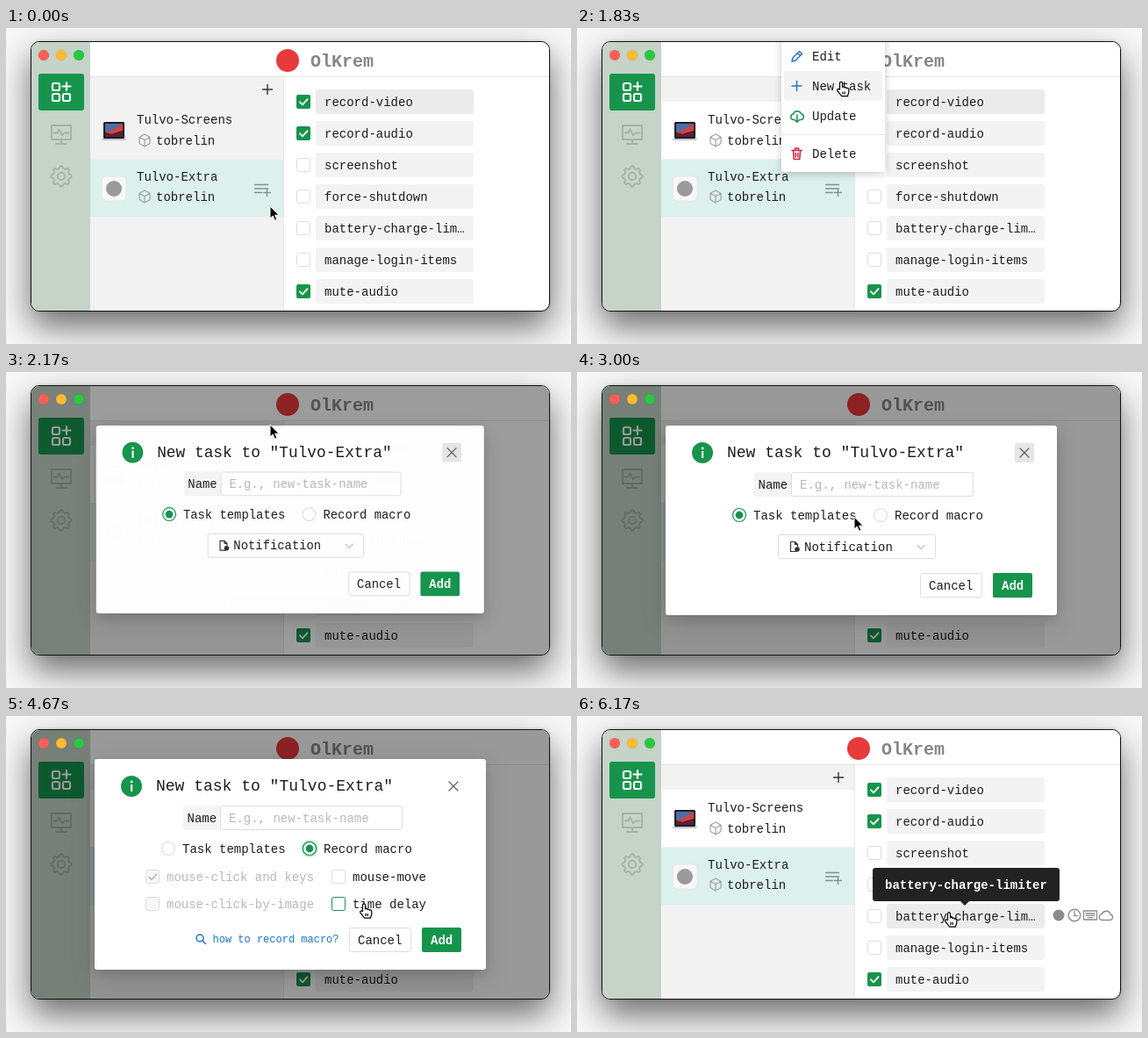
An HTML page that plays this animation: 644 px wide and 360 px high, repeating every 6340 ms.

```html
<!DOCTYPE html>
<html lang="en">
<head>
<meta charset="utf-8">
<title>Task manager demo</title>
<style>
  html, body { margin: 0; width: 100%; height: 100%; overflow: hidden; background: #fff; }
  #stage { position: relative; width: 644px; height: 360px; overflow: hidden; background: #f8f8f8; }
  #win { position: absolute; left: 28px; top: 15px; width: 590px; height: 306px; border: 1px solid #141414;
    border-radius: 10px; background: #fff; box-shadow: 0 17px 38px rgba(0, 0, 0, .58), 0 0 2px rgba(0, 0, 0, .25); }
  svg { position: absolute; left: 0; top: 0; }
  text { font: 14px "Courier New", "Liberation Mono", monospace; fill: #1c1c1c; }
  .b { font-weight: bold; }
  .title { font-size: 20px; font-weight: bold; fill: #868686; }
  .head { font-size: 18px; }
  .link { font-size: 12px; fill: #1b74cc; }
  .dim { fill: #b8b8b8; }
  .line { fill: none; stroke-linecap: round; stroke-linejoin: round; }
  #cancel.on rect, #select.on rect, #delay.on rect, #rec.on .ring { stroke: #16944c; }
  #cancel.on text { fill: #16944c; }
  #box { filter: drop-shadow(0 5px 7px rgba(0, 0, 0, .12)) drop-shadow(0 8px 14px rgba(0, 0, 0, .12)); }
  #menu > .card { filter: drop-shadow(0 2px 5px rgba(0, 0, 0, .22)); }
</style>
</head>
<body>
<div id="stage">
  <div id="win"></div>
  <svg id="art" width="644" height="360" viewBox="0 0 644 360"></svg>
</div>
<script>
const GREEN = '#16944c', GREY = '#8c8c8c', EDGE = '#dedee2';
const LOOP = 6340;

const text = (x, y, s, cls = '') => `<text x="${x}" y="${y}" class="${cls}">${s}</text>`;
const rect = (x, y, w, h, fill, more = '') =>
  `<rect x="${x}" y="${y}" width="${w}" height="${h}" fill="${fill}" ${more}/>`;
const frame = (x, y, w, h, rx = 2, fill = '#fff') =>
  rect(x + .5, y + .5, w - 1, h - 1, fill, `rx="${rx}" stroke="${EDGE}"`);
const circle = (x, y, r, fill, more = '') => `<circle cx="${x}" cy="${y}" r="${r}" fill="${fill}" ${more}/>`;
const line = (d, color, w = 1.5) => `<path class="line" d="${d}" stroke="${color}" stroke-width="${w}"/>`;
const group = (id, body, more = '') => `<g id="${id}" ${more}>${body}</g>`;

const tick = (x, y, color) => line(`M${x + 4} ${y + 8.3}l3 3 5.4-6`, color, 1.9);
const checkbox = (x, y, on) => on
  ? rect(x, y, 16, 16, GREEN, 'rx="2"') + tick(x, y, '#fff')
  : frame(x, y, 16, 16);
const cube = (x, y) => line(`M${x} ${y - 7}l6 3.3v7.2l-6 3.5-6-3.5v-7.2zM${x - 6} ${y - 3.7}l6 3.5 6-3.5M${x} ${y}v7`, '#a3a3a3', 1.2);

function gear(x, y) {
  let d = '';
  for (let i = 0; i < 32; i++) {
    const a = (i - .5) * Math.PI / 16, r = i % 4 < 2 ? 11.6 : 9.2;
    d += `${i ? 'L' : 'M'}${(x + r * Math.cos(a)).toFixed(1)} ${(y + r * Math.sin(a)).toFixed(1)}`;
  }
  return line(d + 'z', '#a4b1a8', 1.8) + circle(x, y, 4.2, 'none', 'stroke="#a4b1a8" stroke-width="1.8"');
}

const sidebar = rect(29, 16, 67, 306, '#c5d3c9') +
  rect(37, 52, 52, 42, GREEN, 'rx="3"') +
  [[53, 63], [53, 75], [65, 75]].map(([x, y]) =>
    rect(x, y, 8, 8, 'none', 'rx="1.8" stroke="#fff" stroke-width="2.2"')).join('') +
  line('M69 62v9M64.5 66.5h9', '#fff', 2.2) +
  line('M52 111h22v16H52zM63 127v4M57 132h12M54.5 119.5h4l2-4 3.5 7 2.5-3h5', '#a4b1a8', 1.8) +
  gear(63, 169);

const header = rect(96, 16, 523, 39, '#fff') + rect(96, 55, 523, 1, '#e6e6e6') +
  circle(321, 37, 13, '#e8393b') + text(347, 43.5, 'OlKrem', 'title');

const laptop = rect(111, 107, 24, 19, '#1c1c22', 'rx="1.5"') +
  '<path d="M113 109h20l-9 7-11 3z" fill="#4a6fa8"/><path d="M133 109v8l-13 4-7-2 11-4z" fill="#d8423c"/>' +
  '<path d="M113 124v-4l8 1 12-3v6z" fill="#5a1f3a"/>' + rect(109, 126, 28, 2, '#c4c4c8', 'rx="1"');

const projects = rect(96, 56, 220, 266, '#f2f2f2') + rect(316, 56, 1, 266, '#e8e8e8') +
  line('M298 64.5v11M292.5 70h11', '#333', 1.4) +
  rect(96, 84, 220, 65, '#fff', 'id="row"') + rect(96, 150, 220, 65, '#dcf0ec') + laptop +
  rect(109, 169, 28, 28, '#f7f7f7', 'rx="5" stroke="#e4e4e4"') + circle(123, 183, 9, '#9a9a9a') +
  text(149, 109, 'Tulvo-Screens') + text(149, 174, 'Tulvo-Extra') +
  [128, 192].map(y => cube(158, y) + text(171, y + 4.5, 'tobrelin')).join('') +
  line('M283.5 178.5h15M283.5 183h15M283.5 187.5h8M297.5 183.5v8M293.5 187.5h8', '#85918e', 1.4);

const names = ['record-video', 'record-audio', 'screenshot', 'force-shutdown',
  'battery-charge-lim…', 'manage-login-items', 'mute-audio'];
const tasks = names.map((s, i) => {
  const y = 84 + 36 * i;
  return checkbox(331, y - 8, [0, 1, 6].includes(i)) +
    rect(353, y - 14, 180, 28, '#f3f3f3', `id="task${i}" rx="3"`) + text(363, y + 4.5, s);
}).join('');

const tools = circle(549, 227, 6.5, GREY) +
  circle(567, 227, 6.8, 'none', `stroke="${GREY}" stroke-width="1.4"`) +
  line('M567 222.5v5h3.5', GREY, 1.3) +
  line('M577.5 222h15v10h-15zM580 225h10M580 227.3h10M582 229.7h6', GREY, 1.3) +
  line('M599 232.5a3.5 3.5 0 0 1-.5-7 5 5 0 0 1 9.5.5 3.3 3.3 0 0 1-.5 6.5z', GREY, 1.4);

const tip = rect(337, 173, 213, 38, '#222', 'rx="3"') + '<path d="M436 210h12l-6 6z" fill="#222"/>' +
  '<text x="351" y="197" class="b" style="fill:#fff">battery-charge-limiter</text>';

const menu = rect(233, 8, 118, 156, '#fff', 'class="card" rx="3"') +
  rect(236, 49, 112, 34, '#f3f3f3', 'id="hover" rx="3"') + rect(233, 121, 118, 1, '#e8e8e8') +
  ['Edit', 'New task', 'Update', 'Delete'].map((s, i) => text(268, [37, 71, 105, 148][i], s)).join('') +
  line('M245 38l1-4 7.5-7.5 3 3L249 37zM251.5 28.5l3 3', '#2a72c4') +
  line('M250.5 60.5v11M245 66h11', '#2a72c4') +
  line('M247 104.5h-.5a3.3 3.3 0 0 1 0-6.5 4.8 4.8 0 0 1 9-.3 3.5 3.5 0 0 1 .2 6.8h-1M250.8 99v8M248 104.5l2.8 2.8 2.8-2.8', GREEN) +
  line('M245 139.5h11M246.5 139.5l.7 10h6.6l.7-10M248.5 139v-2h4v2M249.2 142.5v4.5M251.8 142.5v4.5', '#d0213c');

const radio = (id, x) => group(id, circle(x, 102, 7.5, '#fff', `class="ring" stroke="${EDGE}" stroke-width="1.2"`) +
  circle(x, 102, 4.4, GREEN, 'class="dot"'));

const option = (x, y, s, off, on) => frame(x, y - 8, 16, 16, 2, off ? '#f7f7f8' : '#fff') +
  (on ? tick(x, y - 8, '#bdbdbd') : '') + text(x + 24, y + 4.5, s, off ? 'dim' : '');

// Dialog parts are placed relative to its top edge.
const dialog = rect(101, 0, 446, 216, '#fff', 'id="box" rx="3"') +
  circle(143, 31, 12, GREEN) + rect(142, 29, 2.2, 8, '#fff') + circle(143.1, 26, 1.4, '#fff') +
  text(171, 36, 'New task to "Tulvo-Extra"', 'head') +
  rect(499, 20, 22, 22, '#e6e6e6', 'id="focus" rx="2"') + line('M505 26l10 10M515 26l-10 10', '#666', 1.3) +
  rect(202, 53, 42, 28, '#f4f4f4', 'rx="2"') + text(206.5, 72, 'Name') +
  frame(244, 53, 208, 28) + text(254, 71.5, 'E.g., new-task-name', 'dim') +
  radio('tmpl', 185) + radio('rec', 346) +
  text(201, 106.5, 'Task templates') + text(362, 106.5, 'Record macro') +
  group('select', frame(229, 124, 180, 28) +
    line('M250 143.5h-6.5v-11h5l3 3v2.5M248.5 132.5v3h3', '#333', 1.2) + circle(251, 141, 2.8, '#333') +
    text(259, 142.5, 'Notification') + line('M388 136.5l4 4 4-4', '#c4c4c4', 1.2)) +
  group('macro', option(159, 134, 'mouse-click and keys', true, true) + option(371, 134, 'mouse-move') +
    option(159, 165, 'mouse-click-by-image', true) + group('delay', option(371, 165, 'time delay')) +
    circle(221, 204, 4, 'none', 'stroke="#1b74cc" stroke-width="1.5"') +
    line('M224 207l3.5 3.5', '#1b74cc') + text(235.5, 209, 'how to record macro?', 'link')) +
  group('foot', group('cancel', frame(391, 0, 71, 28) + text(401, 19, 'Cancel')) +
    rect(474, 0, 45, 28, GREEN, 'rx="2"') + '<text x="484" y="19" class="b" style="fill:#fff">Add</text>');

const lights = ['#fe5f57', '#febc2e', '#28c840'].map((c, i) =>
  circle(43 + 20 * i, 31, 6, c, 'stroke="#000" stroke-opacity=".12" stroke-width=".6"')).join('');
const arrow = '<path d="M0 0V14l3.2-2.9 2.3 5.2 2.4-1.1-2.3-5H10z" fill="#000" stroke="#fff"/>';
const hand = '<path d="M-1.5 8.5V1.3a1.5 1.5 0 0 1 3 0V6a1.5 1.5 0 0 1 2.7.6 1.4 1.4 0 0 1 2.4.8 1.3 1.3 0 0 1 2.2 1.2v2.9c0 2-1.3 2.6-1.3 4.7H.5c-.5-2-3-3.5-4.7-6.3-.8-1.4 1-2.8 2.7-1.4zM2 11v3M4.2 11v3" fill="#fff" stroke="#000" stroke-width="1.2" stroke-linejoin="round"/>';

document.getElementById('art').innerHTML =
  '<clipPath id="clip"><rect x="29" y="16" width="590" height="306" rx="9"/></clipPath><g clip-path="url(#clip)">' +
  sidebar + header + projects + tasks + group('tools', tools) + group('tip', tip) + group('menu', menu) +
  rect(29, 16, 590, 306, '#000', 'id="mask"') + group('dialog', dialog) + lights + '</g>' +
  group('arrow', arrow) + group('hand', hand);

const el = id => document.getElementById(id);
const set = (id, key, value) => el(id).setAttribute(key, value);
const show = (id, alpha) => set(id, 'opacity', +alpha);

// Pointer stops: step, x, y, hand?
const path = [[0, 301, 203, 0], [2, 298, 195, 0], [3, 292, 182, 1], [6, 292, 181, 1], [7, 294, 150, 0],
  [8, 298, 104, 1], [10, 301, 62, 1], [12, 301, 61, 1], [13, 301, 60, 0], [15, 301, 60, 0], [17, 308, 105, 0],
  [18, 316, 165, 0], [19, 325, 195, 1], [20, 336, 194, 1], [22, 368, 167, 1], [25, 368, 167, 0],
  [26, 374, 176, 0], [28, 408, 214, 1], [29, 412, 218, 1], [31, 422, 247, 1], [32, 424, 249, 1],
  [33, 424, 249, 1], [34, 423, 222, 0], [35, 423, 222, 0], [36, 424, 224, 1], [38, 424, 224, 1]];

// Partly faded steps: menu alpha, mask alpha, dialog alpha, dialog scale.
const open = [0, .4, 1, 1];
const fades = { 5: [.6, 0, 0, 1], 12: [.4, .13, .3, .65], 13: [0, .39, .99, .991], 34: [0, .06, .52, .78] };
const fadeAt = n => fades[n] || (n > 13 && n < 34 ? open : [n > 5 && n < 12 ? 1 : 0, 0, 0, 1]);

function render(time) {
  const n = Math.min(37, Math.floor((time + 4) * .006)); // six steps a second
  const i = path.findLastIndex(p => p[0] <= n), a = path[i], b = path[i + 1];
  const k = (n - a[0]) / (b[0] - a[0]);
  const at = `translate(${a[1] + (b[1] - a[1]) * k} ${a[2] + (b[2] - a[2]) * k})`;
  set('arrow', 'transform', at);
  set('hand', 'transform', at);
  show('hand', a[3]);
  show('arrow', !a[3]);

  const [menuAlpha, mask, alpha, scale] = fadeAt(n);
  show('menu', menuAlpha);
  show('mask', mask);
  show('dialog', alpha);
  show('hover', n >= 8);
  set('hover', 'y', n < 9 ? 83 : 49);

  const macro = n >= 25, top = macro ? 49 : 61;
  set('dialog', 'transform', `translate(301 ${top}) scale(${scale}) translate(-301 0)`);
  set('box', 'height', macro ? 240 : 216);
  set('foot', 'transform', `translate(0 ${macro ? 192 : 168})`);
  show('select', !macro);
  show('macro', macro);
  show('focus', !macro);
  for (const [id, on] of [['tmpl', !macro], ['rec', macro]]) {
    const [ring, dot] = el(id).children;
    ring.setAttribute('stroke', on ? GREEN : EDGE);
    dot.setAttribute('opacity', +on);
  }
  el('rec').firstChild.style.filter = macro ? 'drop-shadow(0 0 1.5px #16944c)' : '';
  el('rec').classList.toggle('on', n >= 23);
  el('select').classList.toggle('on', n === 19 || n === 20);
  el('delay').classList.toggle('on', n === 28 || n === 29 || n === 34);
  el('cancel').classList.toggle('on', n >= 31 && n < 34);

  set('row', 'fill', n < 2 ? '#f2f2f2' : '#fff');
  set('task0', 'fill', n < 34 ? '#ebebeb' : '#f3f3f3');
  set('task4', 'fill', n >= 35 ? '#ebebeb' : '#f3f3f3');
  show('tools', n >= 35);
  show('tip', n >= 37 ? 1 : n === 36 ? .6 : 0);
}

const start = performance.now();
function loop() {
  render((performance.now() - start) % LOOP);
  requestAnimationFrame(loop);
}
loop();
</script>
</body>
</html>
```
